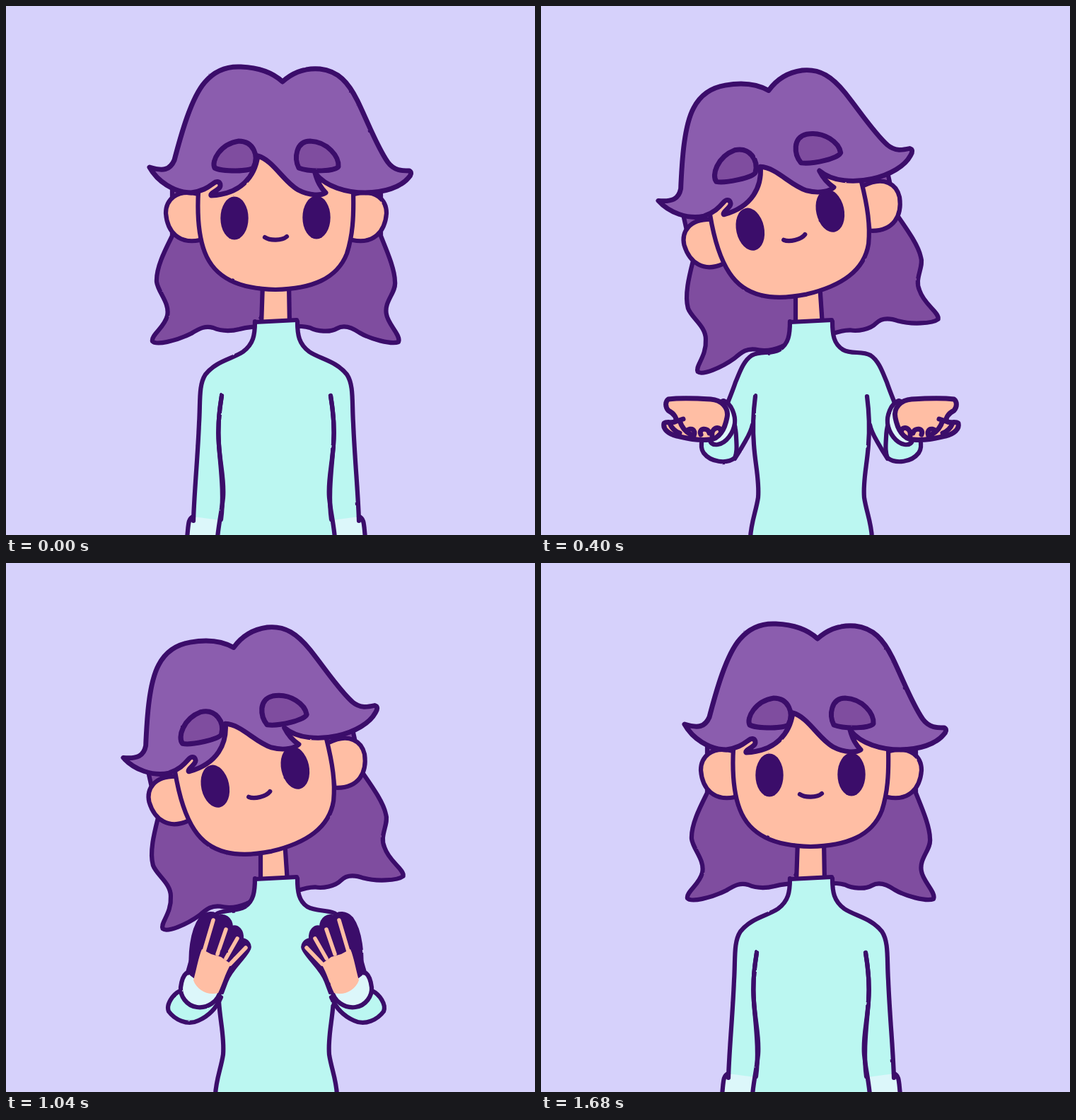
Recreate the animation shown at these times as an HTML page. Size 748x748 px, loop 1.76 s.

```html
<!DOCTYPE html>
<html lang="en">
<head>
<meta charset="utf-8">
<title>Shrug</title>
<style>
  html, body { margin: 0; width: 100%; height: 100%; overflow: hidden; background: #d6d1fb; }
  svg { display: block; width: 100%; height: 100%; }
  path { fill: none; stroke-linecap: round; stroke-linejoin: round; }
  .ink { stroke: #3b0a6a; stroke-width: 6.2; }
  .thick { stroke-width: 7; }
  .skin { fill: #ffbea4; }
  .mint { fill: #bbf7f1; }
  .cuff { fill: #dcf7fa; }
  .dark { fill: #3b0a6a; }
  .front { fill: #8b5dae; }
  .rear { fill: #7f4d9f; }
  .finger { stroke: #ffbea4; stroke-width: 5.5; }
</style>
</head>
<body>
<svg viewBox="0 0 748 748">
  <defs>
    <filter id="rough" filterUnits="userSpaceOnUse" x="0" y="0" width="748" height="748">
      <feTurbulence type="fractalNoise" baseFrequency=".11" numOctaves="1" seed="4" result="n"/>
      <feDisplacementMap in="SourceGraphic" in2="n" scale="1.8" xChannelSelector="R" yChannelSelector="G"/>
    </filter>
    <g id="handB">
      <path class="ink skin" d="M276 650C280 640 292 640 300 648C306 656 306 664 309 670C315 676 326 680 327 688C338 696 352 706 355 716C350 726 330 721 318 714C300 704 285 692 281 680C277 668 273 660 276 650Z"/>
      <path class="ink" d="M304 657C296 654 290 658 291 664M327 688C315 686 300 690 290 683M341 702C325 704 306 700 298 692M350 713C335 715 322 713 312 707"/>
    </g>
    <g id="handC">
      <path class="ink thick skin" d="M180 556C195 554 225 555 240 556C255 557 266 568 263 582C260 598 252 613 238 613C222 615 205 611 192 608C180 605 172 598 174 590C178 587 184 590 189 588C194 584 188 576 180 572C175 566 176 559 180 556Z"/>
      <path class="ink thick" d="M189 588L201 584M182 590Q186 600 196 604M196 586Q200 600 212 606M206 601C212 595 220 599 216 608M226 606C222 597 236 595 238 604M242 608C240 597 252 593 254 600"/>
    </g>
    <g id="handD">
      <path class="ink dark" style="stroke-width:4" d="M262 582C258 555 262 520 275 502C283 493 295 493 300 500C308 496 319 502 319 515C328 512 335 520 334 532C341 533 348 540 343 548C335 562 318 575 312 592L306 608L298 604L266 585Z"/>
      <path class="skin" d="M265 590C270 572 272 558 277 546L290 553L304 557L318 567C310 580 306 596 300 608C285 612 270 604 265 590Z"/>
      <path class="finger" d="M293 505L280 549M311 518L299 553M327 531L311 559M339 544L317 567"/>
    </g>
  </defs>
  <g filter="url(#rough)">
    <path id="rear" class="ink rear"/>
    <path id="neck" class="ink skin"/>
    <g id="head">
      <g id="ears">
        <path class="ink skin" d="M272 266C240 258 226 275 226 293C228 320 245 337 274 331"/>
        <path class="ink skin" d="M492 266C524 258 538 275 538 293C536 320 519 337 490 331"/>
      </g>
      <path id="face" class="ink skin" d="M272 200L272 262C270 300 274 330 281 348C295 385 330 400 381 401C432 400 468 386 482 350C490 325 492 300 491 262L491 200Z"/>
      <ellipse class="dark" cx="323" cy="300" rx="19.7" ry="30.5"/>
      <ellipse class="dark" cx="439" cy="299" rx="19.7" ry="30.5"/>
      <path id="mouth" class="ink" d="M366 327C373 332 390 332 397 326"/>
      <path id="fringe" class="ink thick front" d="M203 228C222 234 232 232 238 218C248 180 262 130 281 108C296 90 313 85 332 86C358 87 378 95 391 107C402 97 420 87 444 89C470 92 484 108 497 134C512 165 525 200 540 221C549 233 560 233 570 233C574 235 573 239 569 243C558 256 535 264 508 264C482 264 452 256 437 236C440 248 446 258 452 264C446 268 430 269 413 260C392 248 378 218 356 212C352 240 333 266 290 268C288 264 303 260 303 254C303 248 298 247 293 251C285 257 277 262 262 264C238 264 214 248 203 228Z"/>
      <g id="brows">
        <path class="ink thick rear" d="M295 229C290 219 303 195 329 191C350 191 358 212 350 228C346 235 305 234 295 229Z"/>
        <path class="ink thick rear" d="M414 229C407 215 410 191 430 191C455 192 471 213 470 227C466 234 430 235 414 229Z"/>
      </g>
    </g>
    <g id="body"></g>
    <path class="ink" d="M352 447L411 444"/>
  </g>
</svg>
<script>
const LOOP = 1760, STEP = 80;
const $ = id => document.getElementById(id);

// left half: outer, inner and side lines, forearm, cuff, resting cuff
const collar = 'M352 446C352 465 350 478 ';
const raised = {
  forearm: 'M215 608C225 602 250 600 270 612C285 625 290 650 280 668C262 665 240 650 222 632C213 624 212 616 215 608Z',
  cuff: 'M266 614C285 614 292 632 292 650C290 668 282 684 266 684C250 684 240 668 240 650C240 632 250 614 266 614Z',
  rest: 'M265 722C257 724 258 735 256 752L300 752L302 727Z',
  wrist: [285, 655], drop: [0, 0], hand: 'B'
};
const side = 'M303 552C300 575 299 595 301 620C303 650 309 670 307 695C304 715 297 730 296 752';

const down = {
  ...raised, drop: [42, 105],
  outer: collar + '335 489C320 499 297 502 282 521C272 536 275 560 273 590C271 640 266 690 265 728',
  inner: 'M304 726C309 690 303 650 301 620C299 595 301 575 305 551',
  side: 'M305 551C301 575 299 595 301 620C303 650 309 670 307 695C305 715 301 730 299 752'
};
const settle = {
  ...down,
  outer: collar + '335 489C320 499 297 502 281 521C268 536 269 560 264 590C252 635 255 670 262 724',
  inner: 'M304 726C309 690 303 650 301 620C299 595 300 575 303 553',
  side: 'M303 553C300 575 299 595 301 620C303 650 309 670 307 695C305 715 303 730 302 752',
  rest: 'M260 720C251 722 253 735 252 752L303 752L304 727Z'
};
const clasp = {
  ...raised,
  outer: collar + '335 488C322 495 300 498 286 509C268 525 258 545 246 565C235 580 224 594 215 608',
  inner: 'M270 612C274 607 279 600 283 590C286 584 290 576 293 568',
  side: 'M293 568C296 585 298 600 300 620C304 650 309 670 307 695C303 715 297 730 295 752'
};
const open = {
  ...raised, side, wrist: [255, 590], hand: 'C',
  outer: collar + '337 486C325 493 310 487 298 494C286 502 281 518 275 532C269 550 262 566 250 595',
  inner: 'M274 640C278 634 283 626 288 617C292 610 297 602 299 592',
  forearm: 'M245 585C262 570 275 580 276 610C277 625 277 632 274 639C262 648 240 645 230 632C224 624 226 600 245 585Z',
  cuff: 'M258 558C270 562 275 580 274 590C272 604 262 618 250 620C238 622 235 612 240 590C242 575 245 562 258 558Z'
};
const palms = {
  ...raised, side, wrist: [285, 598], hand: 'D',
  outer: collar + '338 486C325 493 312 490 300 495C282 505 272 520 268 540C262 560 255 590 245 615',
  inner: 'M270 640C278 630 285 620 290 612C294 605 298 600 301 590',
  forearm: 'M246 605C265 604 285 606 304 614C298 628 288 640 272 647C256 655 238 645 230 634C226 624 236 610 246 605Z',
  cuff: 'M255 580C275 575 300 590 303 605C300 620 285 630 270 628C255 626 246 612 247 600C248 592 250 584 255 580Z'
};

const moves = [[0, down], [160, clasp], [320, open], [800, open], [1000, palms],
  [1060, palms], [1200, clasp], [1360, settle], [1680, down], [LOOP, down]];
const tilts = [[0, 0], [80, .3], [160, .664], [240, .88], [320, .97], [400, 1], [1040, 1],
  [1120, .9], [1200, .55], [1280, .17], [1360, .035], [1440, 0], [LOOP, 0]];
const lifts = [[0, 0], [160, 0], [240, .45], [320, .85], [400, 1], [800, 1], [960, .3], [1040, 0], [LOOP, 0]];

const rearHair = 'M235 250L235 325C225 345 212 370 213 390C215 405 232 420 228 438C224 455 205 465 207 474C212 480 240 474 262 463C275 455 282 452 293 455C305 460 318 460 330 457C340 454 350 453 381 453C412 453 420 452 430 455C440 460 458 462 468 456C478 450 490 455 500 462C515 471 545 479 555 475C559 466 540 450 538 436C534 418 552 405 550 390C550 372 538 345 530 325L530 250Z';

const lerp = (a, b, k) => a + (b - a) * k;
const pair = (a, b, k) => a.map((v, i) => lerp(v, b[i], k));
const numbers = s => s.match(/[\d.]+/g);

function mix(a, b, k) {
  const to = numbers(b);
  let i = 0;
  return a.replace(/[\d.]+/g, n => lerp(+n, +to[i++], k).toFixed(1));
}

function span(keys, t) {
  let i = 0;
  while (i < keys.length - 2 && t >= keys[i + 1][0]) i++;
  const [t0, a] = keys[i], [t1, b] = keys[i + 1];
  return [a, b, (t - t0) / (t1 - t0)];
}
const level = (keys, t) => lerp(...span(keys, t));

const line = (cls, d) => `<path class="${cls}" d="${d}"/>`;
const shift = (x, y) => `translate(${x.toFixed(1)} ${y.toFixed(1)})`;
const scaleAt = (x, y, sx, sy) => `translate(${x} ${y}) scale(${sx} ${sy}) translate(${-x} ${-y})`;
const place = (id, transform) => $(id).setAttribute('transform', transform);
const join = d => d.replace('M', 'L');

function half(t) {
  const [a, b, u] = span(moves, t);
  const k = u * u * (3 - 2 * u);
  const part = name => mix(a[name], b[name], k);
  const outer = part('outer'), inner = part('inner'), flank = part('side');
  const drop = pair(a.drop, b.drop, k);
  const resting = drop[1] > 90;

  let out = line('mint', outer + join(inner) + join(flank) + 'L384 752L384 445Z');
  if (resting) {
    const rest = part('rest');
    out += line('cuff', rest) + line('ink', rest.split('L')[0]);
  }
  out += line('ink', outer) + line('ink', inner) + line('ink', flank);
  if (resting) return out;

  const pose = k < .5 ? a : b;
  const wrist = pair(a.wrist, b.wrist, k);
  const move = wrist.map((v, i) => v - pose.wrist[i]);
  return out + `<g transform="${shift(...drop)}">` +
    line('ink mint', part('forearm')) + line('ink cuff', part('cuff')) +
    `<use href="#hand${pose.hand}" transform="${shift(...move)}"/></g>`;
}

// the rear hair hangs lower in the middle as the head leans
const hang = tilt => rearHair.replace(/([\d.]+) ([\d.]+)/g, (m, x, y) =>
  y > 440 ? `${x} ${+y + tilt * (18 - .065 * Math.abs(x - 381))}` : m);

function draw(t) {
  const tilt = level(tilts, t);
  const turn = `rotate(${-12.5 * tilt} 381 432)`;
  place('head', turn);
  place('rear', turn);
  $('rear').setAttribute('d', hang(tilt));
  place('ears', shift(tilt, 8.5 * tilt));
  place('face', shift(0, 6 * tilt));
  place('mouth', shift(0, -2 * tilt));
  place('fringe', shift(0, 4 * tilt) + scaleAt(381, 250, 1 - .011 * tilt, 1 - .022 * tilt));
  place('brows', shift(0, 2 * tilt - 7 * level(lifts, t)) + scaleAt(430, 230, 1 + .03 * tilt, 1));
  $('neck').setAttribute('d', `M${361 - tilt} 452L${363 - 3 * tilt} 392L${400 - 6 * tilt} 392L${401 - 3 * tilt} 452`);
  const arm = half(t);
  $('body').innerHTML = `<g>${arm}</g><g transform="translate(764 0) scale(-1 1)">${arm}</g>`;
}

const start = performance.now();
let last = -1;
function tick() {
  const t = (performance.now() - start) % LOOP;
  const step = Math.floor(t / STEP);
  if (step !== last) draw((last = step) * STEP);
  requestAnimationFrame(tick);
}
tick();
</script>
</body>
</html>
```
